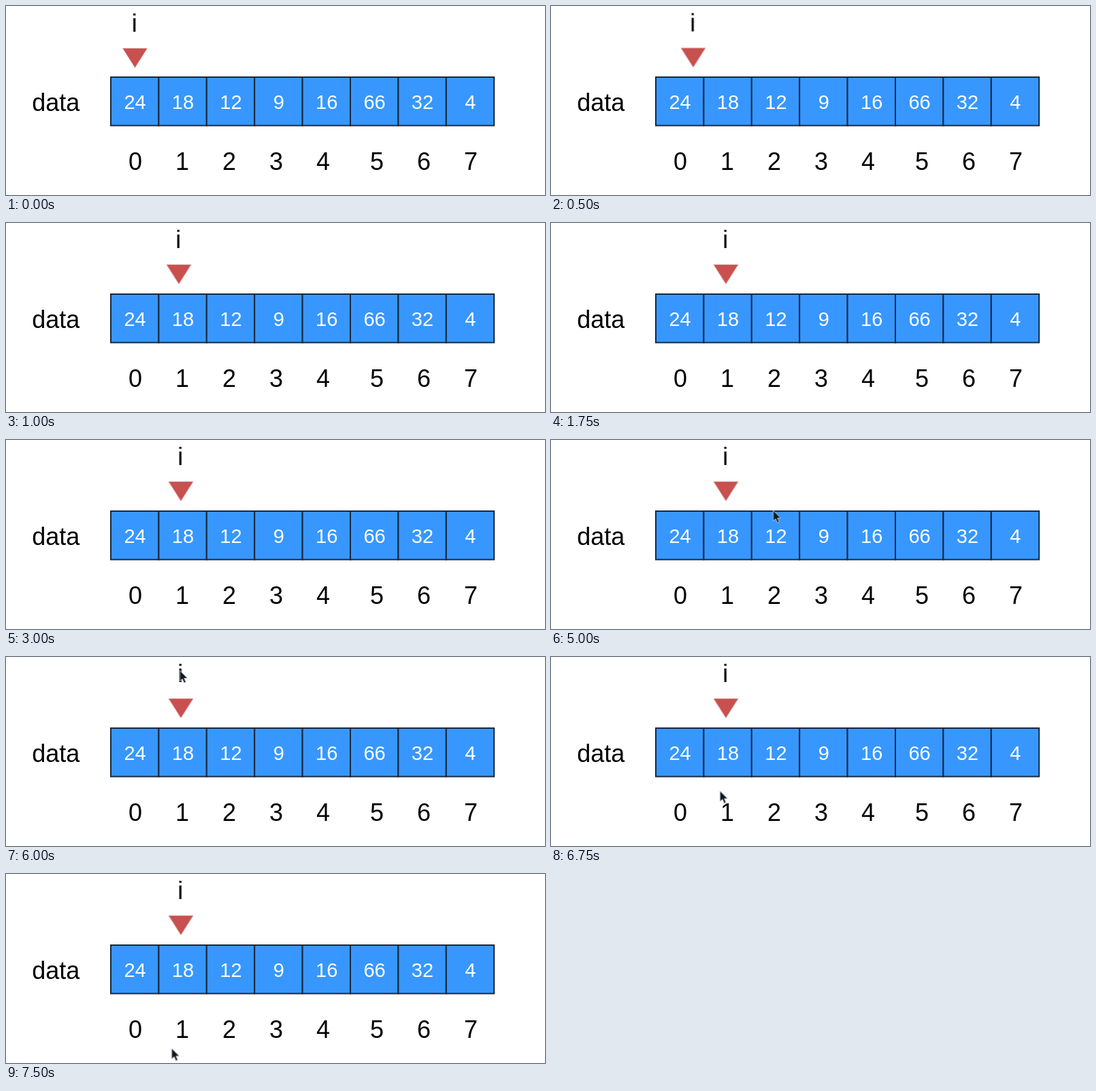
An HTML page for the animation above (8 s loop, 792 by 279 pixels).

```html
<!DOCTYPE html>
<html lang="en">
<head>
<meta charset="utf-8">
<title>Array index</title>
<style>
  html, body { margin: 0; width: 100%; height: 100%; overflow: hidden; background: #fff; }
  svg { display: block; width: 792px; height: 279px; font-family: "Liberation Sans", Arial, sans-serif; }
  text { font-size: 36px; text-anchor: middle; }
  .cell rect { fill: #3797ff; stroke: #17283f; stroke-width: 2; }
  .cell text { font-size: 29px; fill: #fff; }
  .marker { animation: slide 8s step-end infinite; }
  .pointer { animation: travel 8s infinite, appear 8s step-end infinite; }
  .enlarged { animation: flash 8s step-end infinite; }

  /* An eased slide, shown at four pictures per second */
  @keyframes slide {
    0% { transform: translate(189.5px, 1px); }
    3.125% { transform: translate(191.7px, 1px); }
    6.25% { transform: translate(209px, .5px); }
    9.375% { transform: translate(235.5px, .2px); }
    12.5% { transform: translate(254px, 0); }
    15.625%, 100% { transform: translate(257px, 0); }
  }
  @keyframes travel {
    0%, 50% { transform: translate(297px, 135px); animation-timing-function: steps(4); }
    62.5% { transform: translate(326.5px, 104px); animation-timing-function: steps(3); }
    71.875% { transform: translate(257px, 18px); animation-timing-function: step-end; }
    75% { transform: translate(255.5px, 20px); animation-timing-function: steps(4); }
    87.5% { transform: translate(246px, 257px); animation-timing-function: step-end; }
    90.625% { transform: translate(244px, 260px); animation-timing-function: step-end; }
    93.75%, 100% { transform: translate(243.5px, 257.5px); }
  }
  @keyframes appear {
    0% { opacity: 0; }
    50%, 100% { opacity: 1; }
  }
  @keyframes flash {
    0%, 53.125%, 100% { opacity: 0; }
    50% { opacity: 1; }
  }
</style>
</head>
<body>
<svg id="stage" viewBox="0 0 792 279">
  <defs>
    <path id="arrow" d="M0 0V15.6L3.6 12.3L6.2 18.2L8.8 17.1L6.3 11.3H11Z"/>
  </defs>
  <text x="73.3" y="155">data</text>
  <g id="cells"></g>
  <g class="marker">
    <text x="-.7" y="37">i</text>
    <path d="M-18 61.5H18L0 90Z" fill="#c8504f" stroke="#d9a29f" stroke-width=".6"/>
  </g>
  <g class="pointer">
    <use href="#arrow" fill="#111820" stroke="#d5dde6" stroke-width=".8"/>
  </g>
  <g class="enlarged">
    <use href="#arrow" transform="translate(306.5 133) scale(2.55)" fill="#000" stroke="#fff" stroke-width="1"/>
  </g>
</svg>
<script>
  const cells = document.getElementById('cells');
  const values = [24, 18, 12, 9, 16, 66, 32, 4];
  const left = 154, step = 70.4;

  function add(parent, tag, attrs, label = '') {
    const node = document.createElementNS('http://www.w3.org/2000/svg', tag);
    for (const key in attrs) node.setAttribute(key, attrs[key]);
    node.textContent = label;
    return parent.appendChild(node);
  }

  values.forEach((value, i) => {
    const x = left + i * step;
    const cell = add(cells, 'g', { class: 'cell' });
    add(cell, 'rect', { x, y: 105, width: step, height: 71.5 });
    add(cell, 'text', { x: x + step / 2 + .4, y: 152 }, value);
    // The second half of the index row sits after a wider gap
    add(cells, 'text', { x: 190 + i * 69 + (i > 4 ? 10 : 0), y: 242 }, i);
  });
</script>
</body>
</html>
```
